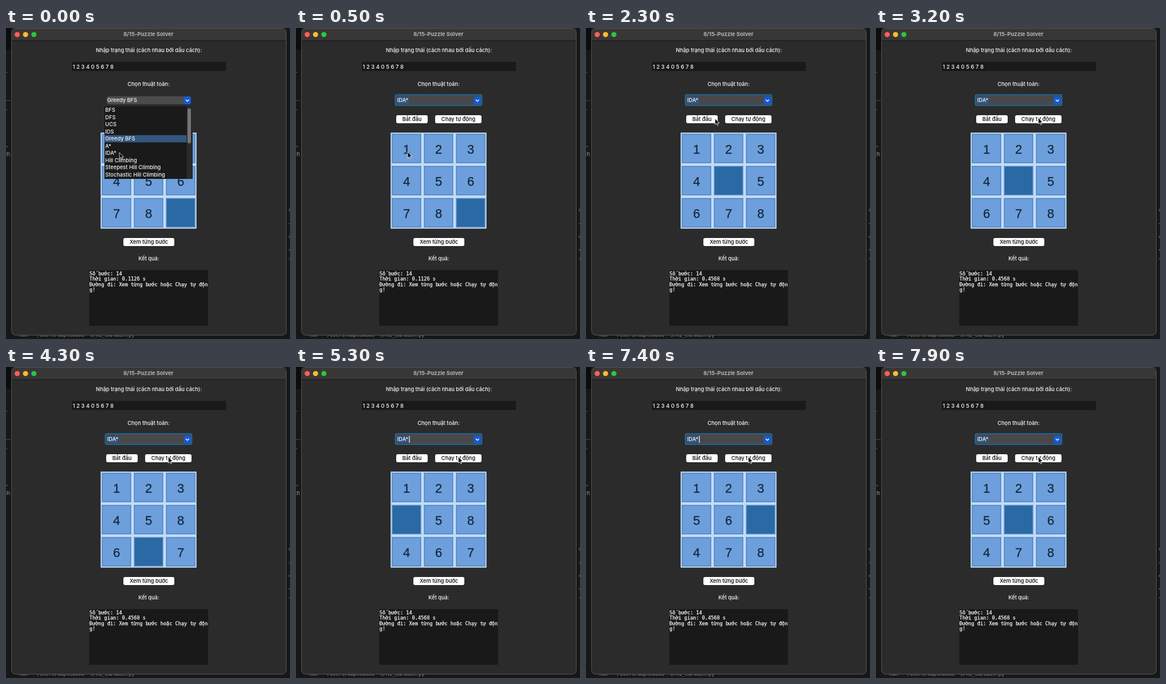
Write an HTML page that moves like this. It is 496 by 542 pixels and loops after 8000 ms.

```html
<!DOCTYPE html>
<html lang="vi">
<head>
<meta charset="utf-8">
<title>8/15-Puzzle Solver</title>
<style>
  html, body { margin: 0; width: 100%; height: 100%; overflow: hidden; background: #171717; }
  svg { display: block; }
  text { font: 500 9.25px Inter, sans-serif; font-feature-settings: "calt" 0; fill: #f8f8f8; white-space: pre; }
  .mid text { text-anchor: middle; }
  .dark text { fill: #000; }
  .mid .title { font-size: 9.5px; font-weight: 700; fill: #b4b2b2; }
  .digits { font-size: 9.5px; }
  .mono text, text.mono { font: 8.58px "DejaVu Sans Mono", monospace; }
  .mono text { stroke: #f8f8f8; stroke-width: .25px; }
  .dim text { fill: #8a8a8a; }
  .tile text { font: 22px "Liberation Sans", Arial, sans-serif; fill: #17283c; stroke: #17283c; stroke-width: .3px; text-anchor: middle; }
</style>
</head>
<body>
<svg width="496" height="542" viewBox="0 0 496 542">
  <rect width="496" height="542" fill="#171717"/>
  <rect width="9" height="38" fill="#0c0c0c"/>
  <g class="dim">
    <text x="0" y="78">.</text>
    <text x="0" y="127">...</text>
    <text x="0" y="143">.</text>
    <text x="0" y="209">-</text>
    <text x="-4" y="223">ch</text>
    <text class="mono" x="23" y="538">nan   /Users/maplewood  9/AI_CN/main.py</text>
  </g>
  <path d="M495 315v5M495 340v2M495 362v4M495 385v3M495 401v2" stroke="#777"/>

  <rect x="9.7" y=".5" width="479.8" height="534.8" rx="7" fill="#2b2b2b" stroke="#565656"/>
  <path d="M10.2 21.5V7.5Q10.2 1 16.7 1H482.5Q489 1 489 7.5V21.5Z" fill="#393636"/>
  <path d="M10.2 22H489" stroke="#191919"/>
  <circle cx="19.6" cy="11.4" r="4.5" fill="#fe5f57"/>
  <circle cx="34.1" cy="11.4" r="4.5" fill="#febc2e"/>
  <circle cx="48.7" cy="11.4" r="4.5" fill="#28c840"/>

  <g fill="#191919">
    <rect x="115" y="59" width="269" height="16"/>
    <rect x="145.5" y="422" width="207.5" height="97"/>
  </g>
  <g class="mid">
    <text class="title" x="248.7" y="13.7">8/15-Puzzle Solver</text>
    <text x="249.5" y="41.7">Nhập trạng thái (cách nhau bởi dấu cách):</text>
    <text x="249" y="101">Chọn thuật toán:</text>
    <text x="249.5" y="405">Kết quả:</text>
  </g>
  <text class="digits" x="116.5" y="70.5">1 2 3 4 0 5 6 7 8</text>

  <g fill="#fff">
    <rect x="175" y="152" width="55" height="14" rx="3"/>
    <rect x="243" y="152" width="81" height="14" rx="3"/>
    <rect x="205" y="366" width="89" height="14" rx="3"/>
  </g>
  <g class="mid dark">
    <text x="202.5" y="162.3">Bắt đầu</text>
    <text x="283.5" y="162.3">Chạy tự động</text>
    <text x="249.5" y="376.3">Xem từng bước</text>
  </g>

  <g class="mono">
    <text x="145.8" y="430.7">Số bước: 14</text>
    <text x="145.8" y="440.1" id="took"></text>
    <text x="145.8" y="449.6">Đường đi: Xem từng bước hoặc Chạy tự độn</text>
    <text x="145.8" y="459.1">g!</text>
  </g>

  <rect x="165.3" y="182.3" width="167.4" height="167.4" fill="#c2dcf6"/>
  <g id="board"></g>

  <rect x="176" y="119" width="147" height="14" rx="3" fill="#4b4b4d"/>
  <g id="focus">
    <rect x="173.5" y="116.3" width="151" height="18.7" rx="2.5" fill="#48484b" stroke="#1670ad" stroke-width="1.6"/>
    <rect x="176" y="120" width="21" height="12" fill="#31567f"/>
    <path id="caret" d="M198 120V132" stroke="#fff" stroke-width="1.2"/>
  </g>
  <text x="176.8" y="129.3" id="choice"></text>
  <rect x="310.5" y="119.5" width="12.5" height="13.5" rx="3" fill="#145bd8"/>
  <path d="M314 125l2.8 2.8l2.8 -2.8" fill="none" stroke="#fff" stroke-width="1.4"/>

  <g id="list">
    <rect x="172" y="136.5" width="154" height="126.5" fill="#1a1a1a"/>
    <rect x="315.5" y="136.5" width="10.5" height="126.5" fill="#2a2a2a"/>
    <rect x="317" y="140" width="6" height="61" rx="3" fill="#757575"/>
    <rect x="172" width="143.5" height="12.5" fill="#33577f" id="mark"/>
  </g>

  <path id="cursor" d="M0 0V10.6L2.5 8.4L4.1 12.1L5.7 11.4L4.2 7.8H7.6Z" fill="#000" stroke="#fff" stroke-width=".8"/>
</svg>
<script>
const LOOP = 8000;
const $ = id => document.getElementById(id);
const show = (el, on) => el.setAttribute('visibility', on ? 'inherit' : 'hidden');

function add(parent, tag, attrs, text = '') {
  const el = document.createElementNS('http://www.w3.org/2000/svg', tag);
  for (const key in attrs) el.setAttribute(key, attrs[key]);
  el.textContent = text;
  return parent.appendChild(el);
}

['BFS', 'DFS', 'UCS', 'IDS', 'Greedy BFS', 'A*', 'IDA*', 'Hill Climbing',
  'Steepest Hill Climbing', 'Stochastic Hill Climbing'].forEach((name, i) =>
  add($('list'), 'text', { x: 173.3, y: 146.4 + 12.5 * i }, name));

const tiles = [...Array(9).keys()].map(i => {
  const x = 167 + 56 * (i % 3), y = 184 + 56 * Math.floor(i / 3);
  const g = add($('board'), 'g', { class: 'tile' });
  add(g, 'rect', { x, y, width: 52, height: 52, fill: '#78a8de' });
  const face = add(g, 'rect', { x: x + 1.5, y: y + 1.5, width: 49, height: 49, stroke: '#5283bb' });
  return { face, label: add(g, 'text', { x: x + 26, y: y + 34.6 }) };
});

// Blank-tile steps of the automatic run
const steps = [1, 3, -1, -1, -3, 1, 3, 1, -3, -1];
const stepTime = i => Math.floor((3340 + 511 * i) / 100) * 100;

function boardAt(t) {
  if (t < 1800) return [...'12345678 '];
  const cells = [...'1234 5678'];
  let blank = 4;
  steps.forEach((d, i) => {
    if (t < stepTime(i)) return;
    cells[blank] = cells[blank + d];
    cells[blank += d] = ' ';
  });
  return cells;
}

// Pointer stops: [time, x, y]
const path = [[0, 198, 217], [200, 195, 216], [800, 195, 216], [1500, 194, 158],
  [2100, 194, 158], [2600, 283, 157], [2700, 283, 157], [3000, 283.6, 156.7], [LOOP, 283.6, 156.7]];

function cursorAt(t) {
  const i = path.findIndex(p => p[0] > t);
  const [t0, x0, y0] = path[i - 1], [t1, x1, y1] = path[i];
  const k = (t - t0) / (t1 - t0), e = k * k * (3 - 2 * k);
  return [x0 + (x1 - x0) * e, y0 + (y1 - y0) * e];
}

function caretOn(t) {
  if (t < 2600) return (t >= 600 && t < 1200) || (t >= 1500 && t < 2300);
  return (t - 2600) % 900 < 600;
}

function draw(now) {
  const t = Math.floor(now % LOOP / 100) * 100;
  boardAt(t).forEach((n, i) => {
    tiles[i].label.textContent = n.trim();
    tiles[i].face.setAttribute('fill', n === ' ' ? '#2a69a3' : '#6d9fdc');
  });
  const open = t < 500;
  show($('list'), open);
  $('mark').setAttribute('y', 136.75 + 12.5 * (t < 400 ? 4 : 6));
  show($('focus'), !open);
  show($('caret'), !open && caretOn(t));
  $('choice').textContent = open ? 'Greedy BFS' : 'IDA*';
  $('took').textContent = `Thời gian: ${t < 2300 ? '0.1126' : '0.4568'} s`;
  $('cursor').setAttribute('transform', `translate(${cursorAt(t)})`);
}

const start = performance.now();
function tick() {
  draw(performance.now() - start);
  requestAnimationFrame(tick);
}
tick();
</script>
</body>
</html>
```
